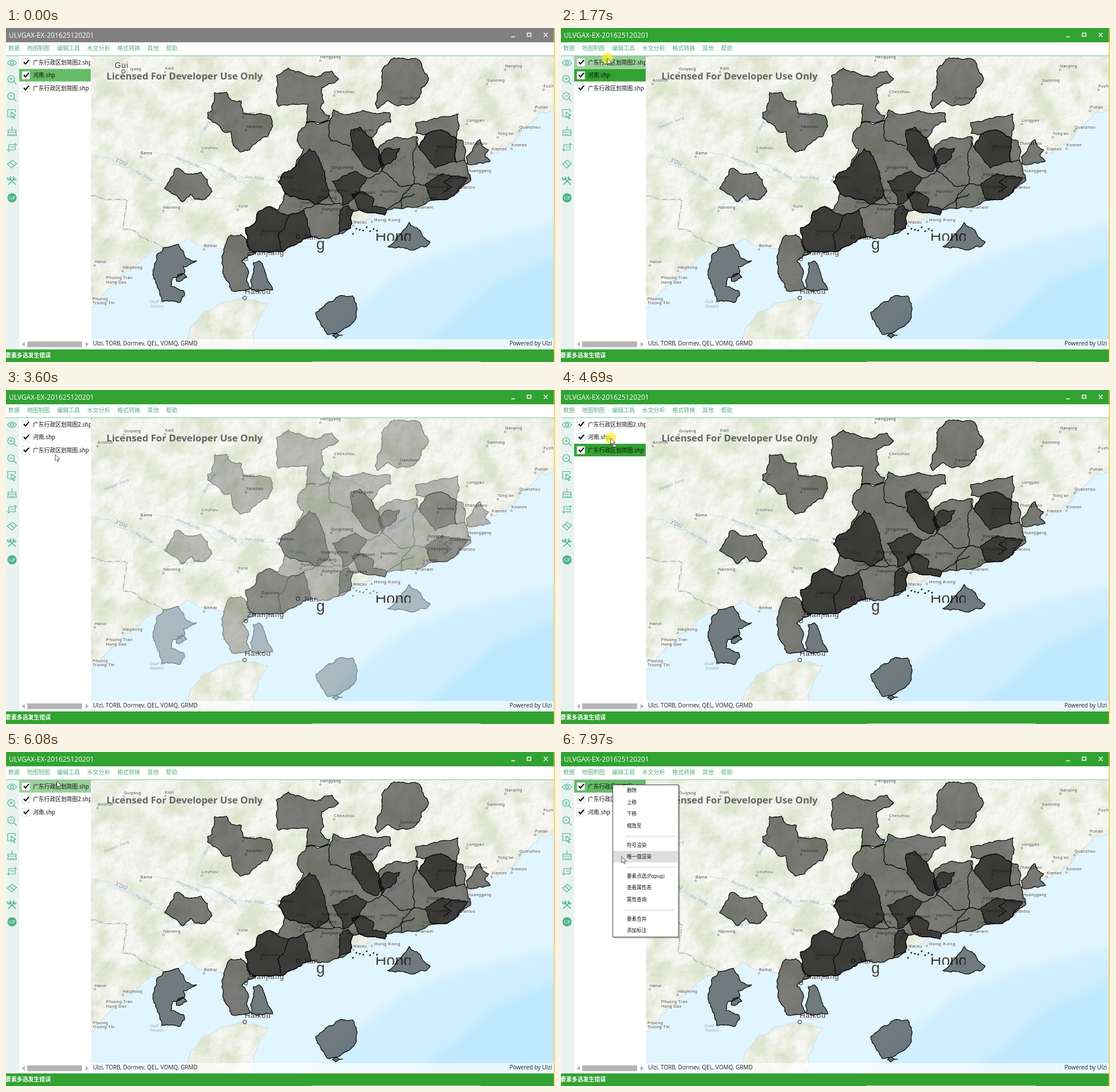
An HTML page that plays this animation: 959x584 px, repeating every 8 s.

```html
<!DOCTYPE html>
<html lang="zh">
<head>
<meta charset="utf-8">
<title>Map layers</title>
<style>
html, body { margin: 0; width: 100%; height: 100%; overflow: hidden; background: #fff; }
svg { position: absolute; left: 0; top: 0; width: 100%; height: 100%; will-change: transform; }
text { white-space: pre; }
.cjk { font-family: "Noto Sans CJK SC", "Noto Sans CJK", "Noto Sans", sans-serif; }
.ui { font-family: "Open Sans", "Noto Sans", sans-serif; }
.place { font-family: "Liberation Sans", sans-serif; fill: #3c3c3c; paint-order: stroke; stroke: #fff; stroke-opacity: .6; stroke-width: 1.4px; }
.river { font: italic 7px "Liberation Sans", sans-serif; fill: #8fa9b8; letter-spacing: .3px; }
.zones path { fill: rgba(0, 0, 0, .5); stroke: #000; stroke-width: 1.2; stroke-linejoin: round; }
.zones .line { fill: none; }
.icons { fill: none; stroke: #4fb286; stroke-width: 1.2; }
</style>
</head>
<body>
<svg viewBox="0 0 959 584">
  <defs>
    <clipPath id="view"><rect x="148.5" y="49" width="808.5" height="510"/></clipPath>
    <clipPath id="shore"></clipPath>
    <clipPath id="hongCut"><rect x="640" y="359" width="66.5" height="13"/></clipPath>
    <clipPath id="jianCut"><rect x="515" y="355" width="28.5" height="20"/></clipPath>
    <filter id="soft" x="-20%" y="-20%" width="140%" height="140%"><feGaussianBlur stdDeviation="9"/></filter>
    <filter id="fuzzy"><feGaussianBlur stdDeviation=".7"/></filter>
    <filter id="green" x="0" y="0" width="100%" height="100%" color-interpolation-filters="sRGB">
      <feTurbulence type="fractalNoise" baseFrequency=".022" numOctaves="5" seed="8"/>
      <feColorMatrix values="0 0 0 0 .88  0 0 0 0 .905  0 0 0 0 .82  3 0 0 0 -1.2"/>
    </filter>
    <filter id="hills" x="0" y="0" width="100%" height="100%" color-interpolation-filters="sRGB">
      <feTurbulence type="fractalNoise" baseFrequency=".06" numOctaves="4" seed="3"/>
      <feDiffuseLighting surfaceScale="2" lighting-color="#fff"><feDistantLight azimuth="225" elevation="60"/></feDiffuseLighting>
      <feColorMatrix values="0 0 0 0 .6  0 0 0 0 .62  0 0 0 0 .52  -.6 0 0 0 .54"/>
    </filter>
  </defs>
  <g clip-path="url(#view)">
    <rect x="148" y="49" width="810" height="510" fill="#e1f5fe"/>
    <g filter="url(#soft)">
      <path d="M530 575L610 490 690 425 790 385 970 340V575Z" fill="#cfeeff"/>
      <path d="M690 575L780 510 850 445 970 395V575Z" fill="#c0e9ff"/>
    </g>
    <g id="coast" fill="none" stroke="#b5d9e8" stroke-width="1.6"/>
    <g clip-path="url(#shore)">
      <rect id="land" x="148" y="49" width="810" height="510" fill="#f7f7f3"/>
      <use href="#land" filter="url(#green)"/>
      <use href="#land" filter="url(#hills)"/>
    </g>
    <path id="border" fill="none" stroke="#b9b9b9" stroke-width="2" stroke-dasharray="9 2 2 2"/>
    <g id="streams" fill="none" stroke="#c5e0ec"/>
    <g id="places"></g>
  </g>
</svg>

<svg viewBox="0 0 959 584">
  <g clip-path="url(#view)">
    <g class="zones" id="lower"></g>
    <g class="zones" id="upper"></g>
  </g>
</svg>

<svg viewBox="0 0 959 584">
  <defs><clipPath id="panel"><rect x="23" y="49" width="125" height="500"/></clipPath></defs>
  <text class="ui" x="175.5" y="90" font-size="16.8" font-weight="700" fill="#444" fill-opacity=".82">Licensed For Developer Use Only</text>
  <rect x="148" y="544" width="809" height="15" fill="#fff" fill-opacity=".65"/>
  <g class="ui" font-size="10" fill="#222">
    <text x="152" y="555">Ulzi, TORB, Dormev, QEL, VOMQ, GRMD</text>
    <text x="953.5" y="555" text-anchor="end">Powered by Ulzi</text>
  </g>
  <path d="M0 25H957V48H0zM23 49H148V562H23zM148 559H957V562H148z" fill="#fff"/>
  <path d="M0 49H23V562H0z" fill="#e8f3f1"/>
  <path d="M0 48.5H957" stroke="#7cc9a0"/>
  <rect id="bar" width="959" height="25"/>
  <text class="ui" x="5" y="17" font-size="12" fill="#fff">ULVGAX-EX-201625120201</text>
  <path d="M882.5 15.5H889M910.5 9H917V14.5H910.5zM939.5 8.5l6.5 7m0-7l-6.5 7" fill="none" stroke="#fff" stroke-width="1.4"/>
  <g id="menubar" class="cjk" font-size="10" fill="#4fae7e"></g>
  <g class="icons">
    <path d="M2.5 61q8-10 16 0q-8 10-16 0z"/><circle cx="10.5" cy="61" r="2.6"/>
    <g id="lens"><circle cx="9" cy="89" r="6"/><path d="M13.5 93.5l5 5M6 89h6"/></g>
    <use href="#lens" y="30"/><path d="M9 86v6"/>
    <path d="M8 155H3V142.5H16V147M9 147l8 6-4 .7 2.5 4-2 1-2-4-2.5 2z"/>
    <path d="M10.5 172v6M3.5 178.5h14v3.5h-14zM4 182l-1 6h15l-1-6M7.5 188v-3M11 188v-3M14 188v-3"/>
    <path d="M5 212V204H18l-3-2.5M16 205v8H3l3 2.5M8 208h6"/>
    <path d="M2.5 238l8.5-7 7.5 6-8.5 8zM6.5 234.5l7.5 6.5"/>
    <path d="M4 274l12-12M5 262l12 12M3 261a3 3 0 1 0 4-1M14 260a3 3 0 1 0 4 4" stroke-width="1.7"/>
    <circle cx="10.5" cy="297" r="8" fill="#4fb286" stroke="none"/>
    <text x="10.5" y="300" text-anchor="middle" font-family="Liberation Serif, serif" font-size="8.5" fill="#fff" stroke="none">GP</text>
  </g>
  <g id="rows" class="cjk" font-size="9.8" clip-path="url(#panel)"></g>
  <path d="M37 548H133V558H37zM33 548.5V557.5L27.5 553zM139 548.5V557.5L144.5 553z" fill="#b6b6b6"/>
  <rect y="562" width="957" height="22" fill="#32a232"/>
  <path d="M534 583.5H829" stroke="#c5e5c5"/>
  <text class="cjk" x="-1" y="576" font-size="9.9" font-weight="700" fill="#fff">要素多选发生错误</text>
  <path d="M957.7 0V584" stroke="#ecca45" stroke-width="1.6"/>
  <rect x="149" y="48" width="2" height="2" fill="#f0b030"/>
  <g id="menu" class="cjk" font-size="8.6" fill="#111"></g>
  <g id="pointer">
    <circle id="ring" r="10" fill="#fbee28" fill-opacity=".75"/>
    <rect id="drag" x="4" y="11" width="5" height="4" fill="#fff" stroke="#555" stroke-width=".8"/>
    <path d="M0 0V10.8L2.5 8.5L4.3 12.5L6 11.7L4.3 8H7.7z" fill="#fff" stroke="#222" stroke-width=".8"/>
  </g>
</svg>

<script>
const $ = id => document.getElementById(id);
const put = (id, markup) => $(id).insertAdjacentHTML('beforeend', markup);
const show = (el, on) => { el.style.display = on ? '' : 'none'; };
const clamp = u => Math.min(1, Math.max(0, u));

// Jagged edges: midpoints are moved by a hash of the edge, so neighbours share one border.
const noise = (a, b) => {
  const s = Math.sin(a * 12.9898 + b * 78.233) * 43758.5453;
  return s - Math.floor(s) - .5;
};
function split(a, b) {
  const dx = b[0] - a[0], dy = b[1] - a[1], len = Math.hypot(dx, dy);
  if (len < 4) return [b];
  const way = a[0] + a[1] * 7 < b[0] + b[1] * 7 ? 1 : -1;
  const k = way * noise(a[0] + b[0], a[1] + b[1]) * Math.min(.3, 5 / len);
  const m = [(a[0] + b[0]) / 2 - dy * k, (a[1] + b[1]) / 2 + dx * k];
  return [...split(a, m), ...split(m, b)];
}
function rough(spec, closed = true) {
  const pts = spec.match(/\S+ \S+/g).map(p => p.split(' ').map(Number));
  const ends = closed ? [...pts.slice(1), pts[0]] : pts.slice(1);
  const out = ends.flatMap((q, i) => split(pts[i], q));
  return 'M' + [pts[0], ...out].map(p => p.map(v => v.toFixed(1)).join(' ')).join('L') + (closed ? 'Z' : '');
}
const zone = (spec, layer = 'lower') => put(layer, `<path d="${rough(spec)}"/>`);
const line = (spec, layer = 'lower') => put(layer, `<path class="line" d="${rough(spec, false)}"/>`);

const province = '513 180 525 165 548 168 566 162 572 143 590 151 620 146 670 148 672 165 655 170 638 192 650 212 665 197 690 192 ' +
  '718 190 721 208 735 185 716 184 716 165 742 160 790 150 792 170 786 192 798 197 806 250 812 266 785 290 770 300 745 301 720 313 ' +
  '690 316 665 318 662 327 618 318 607 320 602 350 560 368 533 365 488 388 435 392 425 385 418 350 436 340 440 322 460 312 476 318 ' +
  '487 290 476 270 487 252 505 243 520 212 510 200';
const peninsula = '384 378 393 362 410 361 420 370 427 392 437 392 412 408 420 418 422 445 427 456 394 459 390 446 381 435 377 410';
const mainland = '130 493 153 488 185 450 230 412 250 395 300 378 315 367 340 380 383 388 435 388 560 360 640 328 800 262 806 250 ' +
  '862 213 895 190 906 174 931 148 975 142 975 30 130 30';
const hainan = '318 575 322 526 345 497 395 477 417 474 456 482 432 531 424 575';
for (const d of [mainland, province, peninsula, hainan].map(s => rough(s))) {
  put('shore', `<path d="${d}"/>`);
  put('coast', `<path d="${d}"/>`);
}
$('border').setAttribute('d', rough('148 294 212 303 205 352 225 355 275 386', false));

// shapes on land
zone('364 113 385 112 389 122 411 128 414 149 462 154 466 172 457 190 438 200 426 213 409 217 400 208 393 181 385 183 352 157 352 148 360 144');
zone('472 84 493 70 520 80 550 84 557 77 569 75 581 89 551 104 555 131 549 140 556 150 566 153 562 163 524 165 527 133 476 137 475 98');
zone('678 52 712 53 726 62 738 88 725 106 722 121 712 132 678 134 668 127 649 141 645 132 657 97 656 75 660 68');
zone('277 281 295 247 300 245 312 254 341 252 352 265 360 286 347 300 329 299 322 291 308 304 298 293');
zone('804 225 828 195 832 207 843 213 837 225 846 233 833 237 805 237');
// shapes at sea
zone('263 398 275 384 301 378 314 402 333 407 310 417 312 428 291 437 288 452 311 460 312 468 304 480 272 478 258 438');
zone('301 431 311 430 316 436 298 443');
zone(peninsula);
zone('430 435 432 410 442 407 466 458 428 457');
zone('667 382 688 362 704 340 722 353 728 365 741 374 735 382 705 388');
zone('541 498 555 487 583 468 605 468 612 482 610 510 580 533 562 536');
zone('570 538 577 534 588 537 576 542');
for (let i = 0; i < 8; i++) {
  const x = 605 + i * 6, y = 354 + noise(i, 9) * 14;
  zone(`${x} ${y} ${x + 2} ${y - 1} ${x + 1} ${y + 1}`);
}
// the province, its inner borders, then cities held by both layers
zone(province);
line('566 162 567 197 602 206');
line('487 290 528 300 540 308 575 307 590 310');
line('495 327 520 318 540 308');
line('564 290 575 307');
line('630 262 656 250 690 277 714 272 732 275');
line('718 190 712 235 714 272 690 300 690 316');
line('714 290 690 300 665 318');
line('735 185 760 178 786 192 787 235 803 232');
zone('603 178 618 173 638 192 650 212 660 240 650 250 630 245 604 212', 'upper');
zone('652 222 665 210 688 210 680 230 662 240 656 250', 'upper');
zone('476 270 487 252 505 243 512 230 530 211 541 217 557 252 564 290 540 308 528 300 487 290', 'upper');
zone('418 350 436 340 440 322 460 312 495 327 520 318 533 365 488 388 435 392 425 385', 'upper');
line('495 327 475 362 480 388', 'upper');
zone('570 268 610 250 630 262 618 287 605 300 590 310 585 290', 'upper');
zone('604 290 625 287 643 300 640 312 665 318 662 327 618 318', 'upper');
zone('583 320 597 310 607 320 602 350 580 360', 'upper');
zone('721 208 735 185 760 178 786 192 787 235 750 245', 'upper');
zone('732 275 762 255 806 262 785 290 770 300 745 301', 'upper');
line('780 258 765 270 778 278 764 288', 'upper');

const label = (x, y, name, size = 7, gap = .55, extra = '') =>
  `<text class="place" x="${x}" y="${y}" font-size="${size}" letter-spacing="${gap}" ${extra}>${name}</text>`;
const dot = (x, y, r = 1.5) => `<circle cx="${x}" cy="${y}" r="${r}" fill="#fff" stroke="#666" stroke-width="${r / 2}"/>`;
const town = (x, y, name) => dot(x, +y + 4) + label(x, y, name);
const towns = `549 53 Hengyang;872 69 Nanping;840 94 Sanming;939 104 Fuzhou;278 73 Kaili;573 114 Chenzhou;688 125 Ganzhou;
924 141 Putian;414 152 Guilin;805 164 Longyan;419 175 Yanshan;606 181 Shaoguan;897 176 Quanzhou;859 187 Tong'an;883 207 Kinmen;
848 214 Xiamen;801 204 Zhangzhou;754 210 Meizhou;342 212 Linzhou;235 221 Bama;568 246 Qingcheng;807 252 Huanggang;736 258 Jieyang;
777 264 Chaozhou;474 263 Wuzhou;608 290 Dongguan;655 288 Huizhou;737 280 Chaoyang;790 281 Shantou;544 299 Zhaoqing;515 308 Yunfu;
729 300 Lufeng;716 316 Shanwei;551 319 Jiangmen;595 320 Shenzhen;275 316 Nanning;405 314 Yulin;607 342 Macau;446 357 Gaozhou;
346 383 Beihai;155 411 Hanoi;204 421 Haiphong`;
put('places', towns.split(';').map(s => town(...s.trim().split(' '))).join(''));
put('places', label(550, 286, 'Guangzhou', 8, .8) + label(643, 338, 'Hong Kong', 8, .7) + dot(639, 339) +
  label(175, 439, 'Phuong Tran') + label(175, 447, 'Hung Dao') + label(151, 476, 'Phuong') + label(151, 483, 'Truong Thi') +
  label(421, 397, 'Zhanjiang', 13, .9) + dot(419, 404, 3) + label(417, 465, 'Haikou', 13, .9) + dot(417, 472, 3) +
  label(519, 370, 'Jiang', 13, .7, 'clip-path="url(#jianCut)"') + dot(510, 365, 3) +
  `<g clip-path="url(#hongCut)">${label(645, 374, 'Hong', 27, 0, 'filter="url(#fuzzy)"')}</g>` +
  label(542, 387, 'g', 27, 0, 'filter="url(#fuzzy)"'));

const name = (x, y, turn, text, size = 7) =>
  `<text class="river" transform="translate(${x} ${y}) rotate(${turn})" style="font-size:${size}px">${text}</text>`;
// A river's name with a winding stream beneath it.
function river(x, y, turn, text, size) {
  const d = rough('-40 4 -10 -3 20 4 50 -2 80 5', false);
  put('streams', `<path d="${d}" transform="translate(${x} ${y}) rotate(${turn})"/>`);
  return name(x, y, turn, text, size);
}
put('places', river(189, 233, 22, 'You', 13) + river(225, 252, 28, 'You Jiang') + river(297, 228, 22, 'Hongshui He') +
  river(348, 180, -62, 'Rong Jiang') + river(371, 247, 30, 'Qian Jiang') + river(417, 262, 5, 'Xun Jiang') +
  river(302, 306, -10, 'Yong Jiang') + river(497, 283, 12, 'Xi Jiang') + river(550, 149, 12, 'Bei Jiang') +
  river(668, 247, -36, 'Dong Jiang') + name(251, 481, 0, 'Gulf of', 8) + name(251, 489, 0, 'Tonkin', 8) +
  `<g id="coarse">${dot(205, 76, 3)}${label(190, 70, 'Gui', 14, .8)}${label(217, 74, 'iyang')}</g>` +
  `<g id="fine">${town(206, 74, 'Guiyang')}${town(160, 94, 'Anshun')}${name(172, 176, -22, 'Nanpan Jiang')}</g>`);

let barX = 4;
for (const item of ['数据', '地图制图', '编辑工具', '水文分析', '格式转换', '其他', '帮助']) {
  put('menubar', `<text x="${barX}" y="38.5">${item}</text>`);
  barX += item.length * 10 + 12.6;
}

for (let i = 0; i < 3; i++) put('rows', `<g transform="translate(23 ${49 + i * 22.5})">
  <rect class="band" width="125" height="22"/>
  <rect x="5" y="4.5" width="13.5" height="13.5" fill="#fff" stroke="#ccc" stroke-width=".7"/>
  <path d="M8 10.5l3 3.5l6-7" fill="none" stroke="#000" stroke-width="2"/>
  <text class="name" x="24" y="14.5" fill="#111"></text></g>`);
const bands = [...document.querySelectorAll('.band')], names = [...document.querySelectorAll('.name')];

const groups = ['删除 上移 下移 缩放至', '符号渲染 唯一值渲染', '要素点选(Popup) 查看属性表 属性查询', '要素合并 添加标注'];
const itemYs = [];
put('menu', '<rect x="2" y="2" width="116" height="267" fill="#000" fill-opacity=".2"/>' +
  '<rect x=".5" y=".5" width="115" height="266" fill="#fff" stroke="#444"/><rect id="pick" x="1.5" width="113" height="20" fill="#dedede"/>');
let itemY = 10;
groups.forEach((group, i) => {
  if (i) {
    put('menu', `<path d="M22 ${itemY - 2}H109" stroke="#ccc"/>`);
    itemY += 13;
  }
  for (const item of group.split(' ')) {
    put('menu', `<text x="25" y="${itemY + 3.2}">${item}</text>`);
    itemYs.push(itemY);
    itemY += 20.6;
  }
});

const LOOP = 8000;
// Pointer moves: start, end, x, y; it rests in between.
const moves = [[0, 0, 803, 531], [280, 1060, 51, 45], [1380, 1540, 81, 53], [1990, 2760, 86, 109], [2830, 3000, 86, 113],
  [4000, 4460, 86, 97], [4460, 5300, 89, 51], [6550, 6706, 100, 93], [6860, 7010, 90, 57], [7250, 7970, 106, 183]];
const tint = { n: '#fff', h: '#9bd09b', i: '#66bb66', s: '#32a232' };
// One letter for each row: none, hover, inactive, selected.
const looks = [[0, 'nin'], [1380, 'hin'], [1770, 'hsn'], [1990, 'snn'], [3370, 'nnn'], [4000, 'nnh'], [4460, 'nns'],
  [5700, 'hnn'], [6630, 'nhn'], [6706, 'nin'], [7010, 'inn']];
const within = (t, a, b) => t >= a && t < b;
const pointerAt = t => moves.reduce(([px, py], [a, b, x, y]) => {
  const u = clamp((t - a) / (b - a || 1));
  return [px + (x - px) * u, py + (y - py) * u];
}, moves[0].slice(2));

function draw(t) {
  const [x, y] = pointerAt(t);
  show($('pointer'), t >= 280);
  $('pointer').setAttribute('transform', `translate(${x.toFixed(1)} ${y.toFixed(1)})`);
  show($('ring'), within(t, 1770, 3370) || within(t, 4460, 5700));
  show($('drag'), within(t, 1990, 3370) || within(t, 4690, 5700));

  $('bar').setAttribute('fill', t < 1770 ? '#808080' : '#32a232');
  show($('coarse'), t < 600);
  show($('fine'), t >= 600);

  const look = looks.filter(s => s[0] <= t).pop()[1];
  bands.forEach((b, i) => b.setAttribute('fill', tint[look[i]]));
  const first = '广东行政区划简图.shp', second = '广东行政区划简图2.shp', third = '河南.shp';
  const order = t < 5700 ? [second, third, first] : [first, second, third];
  names.forEach((n, i) => { if (n.textContent !== order[i]) n.textContent = order[i]; });

  // Both reloads clear the layers, then fade them in.
  const reload = t >= 5700 ? 5700 : t >= 3370 ? 3370 : -LOOP;
  const fade = clamp((t - reload - 90) / 290);
  for (const id of ['lower', 'upper']) $(id).setAttribute('opacity', fade.toFixed(3));

  const early = within(t, 6706, 6930);
  show($('menu'), early || t >= 7010);
  const [mx, my] = early ? [100, 93] : [90, 57];
  $('menu').setAttribute('transform', `translate(${mx} ${my})`);
  const hit = t >= 7490 && itemYs.find(v => Math.abs(my + v - y) <= 10.3);
  show($('pick'), hit);
  if (hit) $('pick').setAttribute('y', hit - 10);
}

const start = performance.now();
function tick() {
  draw((performance.now() - start) % LOOP);
  requestAnimationFrame(tick);
}
tick();
</script>
</body>
</html>
```
